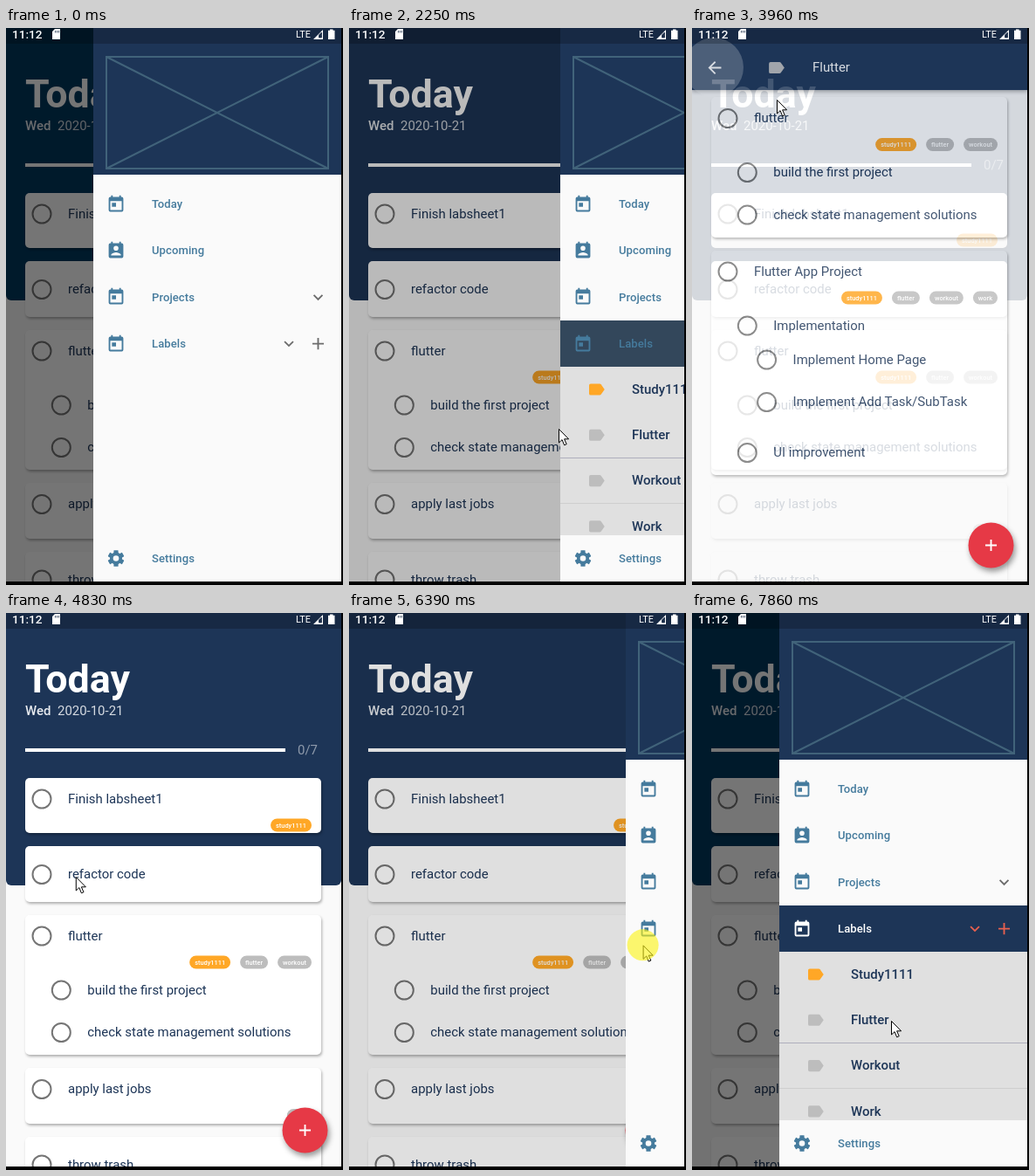
These frames come from a looping animation (386 by 638 pixels, 8 s). An HTML page:

```html
<!DOCTYPE html>
<html lang="en">
<head>
<meta charset="utf-8">
<title>Task list</title>
<style>
  html, body { margin: 0; width: 100%; height: 100%; overflow: hidden; background: #000; }
  svg { display: block; width: 386px; height: 638px; font-family: Roboto, sans-serif; }
  text { white-space: pre; }
  .card { fill: #fff; filter: drop-shadow(1px 2px 1.5px rgba(0, 0, 0, .3)); }
  .fab { fill: #e63946; filter: drop-shadow(2px 4px 3px rgba(0, 0, 0, .4)); }
  .bar { filter: drop-shadow(0 2px 2px rgba(0, 0, 0, .3)); }
  .ring { fill: none; stroke: #757575; stroke-width: 2; }
</style>
</head>
<body>
<svg id="stage" viewBox="0 0 386 638"></svg>
<script>
const NAVY = '#1d3557', DEEP = '#00385f', BLUE = '#457b9d', PAPER = '#fafafa';
const ORANGE = '#ffa726', GREY = '#bdbdbd', DIM = '#6c6c6c', RED = '#e8604f';
const LOOP = 8000, STEP = 77.7, BODY = 14.94, MENU = 13.07;

const CAL = 'M5 3h1V1h2v2h8V1h2v2h1q2 0 2 2v14q0 2-2 2H5q-2 0-2-2V5q0-2 2-2z';
const ICONS = {
  today: CAL + 'M5 8v11h14V8zM7 10h5v5H7z',
  contact: CAL + 'M12 6a3 3 0 0 0 0 6 3 3 0 0 0 0-6zM6 18h12v-1q0-2-6-3-6 1-6 3z',
  tag: 'M17.6 5.8Q17 5 16 5H5Q3 5 3 7v10q0 2 2 2h11q1 0 1.600-.8L22 12z',
  back: 'M20 11H7.800l5.600-5.600L12 4l-8 8 8 8 1.400-1.400L7.800 13H20z',
  more: 'M16.600 8.600 12 13.200 7.400 8.600 6 10l6 6 6-6z',
  add: 'M19 13h-6v6h-2v-6H5v-2h6V5h2v6h6z'
};

const text = (x, y, s, size, fill, weight = 400, more = '') =>
  `<text x="${x}" y="${Math.round(y + size * .355 - .5)}" font-size="${size}" fill="${fill}" font-weight="${weight}" ${more}>${s}</text>`;
const rect = (x, y, w, h, fill, more = '') =>
  `<rect x="${x}" y="${y}" width="${w}" height="${h}" fill="${fill}" ${more}/>`;
const icon = (name, x, y, fill) =>
  `<path fill="${fill}" fill-rule="evenodd" transform="translate(${x - 11.2} ${y - 11.2}) scale(.934)" d="${ICONS[name]}"/>`;

const pen = document.createElement('canvas').getContext('2d');
function chips(y, names) {
  let right = 350;
  return names.slice().reverse().map(name => {
    pen.font = '500 7.4px Roboto, sans-serif';
    const w = pen.measureText(name).width + 12, x = right - w;
    right = x - 11;
    return rect(x, y - 7.5, w, 15, name === 'study1111' ? ORANGE : GREY, 'rx="7.5"') +
      text(x + w / 2, y + .4, name, 7.4, '#fff', 500, 'text-anchor="middle"');
  }).join('');
}

// A card is a heading with chips, then subtasks; '>' marks a deeper level
function cards(top, list) {
  return list.map(([head, tags, ...subs]) => {
    let y = top + (tags.length ? 24 : 32), level = 0;
    const row = s => `<circle class="ring" cx="${41 + level * 22.3}" cy="${y}" r="10.5"/>` +
      text(71 + level * 22.3, y, s, BODY, NAVY);
    let out = row(head) + chips(y + 30, tags);
    if (subs.length) y += 23;
    for (const sub of subs) {
      const depth = sub.startsWith('>') ? 2 : 1;
      y += 48.5 - 9.5 * (depth - level);
      level = depth;
      out += row(sub.replace('>', ''));
    }
    const y0 = Math.floor(top), end = subs.length ? y + 26 : top + 63.5;
    top = end + 15;
    return `<rect class="card" x="22" y="${y0}" width="339" height="${Math.floor(end) - y0}" rx="5"/>` + out;
  }).join('');
}

const FLUTTER = ['flutter', ['study1111', 'flutter', 'workout'], 'build the first project', 'check state management solutions'];

const todayPage = () =>
  rect(0, 0, 384, 634, PAPER) + rect(0, -10, 384, 322, NAVY, 'id="header" rx="6"') +
  text(22, 75.5, 'Today', 44.8, '#fff', 700) +
  text(22, 112, 'Wed', BODY, '#e8ebef', 500) + text(59, 112, '2020-10-21', BODY, '#d5dae1') +
  rect(22, 155, 298, 4, '#fff') + text(334, 157, '0/7', BODY, '#8e9aab') +
  cards(189, [['Finish labsheet1', ['study1111']], ['refactor code', []], FLUTTER,
    ['apply last jobs', ['work']], ['throw trash', []]]);

const labelPage = () =>
  rect(0, 0, 384, 800, PAPER) + rect(0, 0, 384, 70, NAVY, 'class="bar"') +
  '<circle id="ripple" cx="25" cy="44" fill="#fff" fill-opacity=".25"/>' +
  icon('back', 26, 44.5, '#fff') + icon('tag', 96.5, 44.5, GREY) + text(138, 44.5, 'Flutter', BODY, '#fff') +
  cards(78.5, [FLUTTER, ['Flutter App Project', ['study1111', 'flutter', 'workout', 'work'], 'Implementation',
    '>Implement Home Page', '>Implement Add Task/SubTask', 'UI improvement']]);

const rowY = i => 202 + 53.2 * i;
const menuText = (y, s, fill) => text(167, y, s, MENU, fill, 500, 'letter-spacing=".08"');
const menuRow = (name, i, s, fill) => icon(name, 126, Math.round(rowY(i)), fill) + menuText(rowY(i), s, fill);
const labelsRow = (ink, tool) =>
  menuRow('today', 3, 'Labels', ink) + icon('more', 324, rowY(3), tool) + icon('add', 357.5, rowY(3), tool);
const labelItem = (s, i) =>
  icon('tag', 141.4, 414 + i * 52.3, i ? GREY : ORANGE) + text(182, 414 + i * 52.3, s, BODY, NAVY, 500);
const activeRow = (id, fill, ink, tool) => `<g id="${id}">${rect(100, 335, 284, 53, fill)}${labelsRow(ink, tool)}</g>`;

function gear(x, y) {
  const teeth = [0, 60, 120].map(a => rect(-2.6, -9.3, 5.2, 18.6, BLUE, `rx=".6" transform="rotate(${a})"`)).join('');
  return `<g transform="translate(${x} ${y})">${teeth}<circle r="7" fill="${BLUE}"/><circle r="3.3" fill="${PAPER}"/></g>`;
}

const drawer = () =>
  rect(100, 168, 284, 466, PAPER) + rect(100, 0, 284, 168, NAVY) +
  '<path d="M115 33H369V161H115zL369 161M369 33 115 161" fill="none" stroke="#41637a" stroke-width="2"/>' +
  menuRow('today', 0, 'Today', BLUE) + menuRow('contact', 1, 'Upcoming', BLUE) +
  menuRow('today', 2, 'Projects', BLUE) + icon('more', 357.5, rowY(2), DIM) + labelsRow(BLUE, DIM) +
  activeRow('active', NAVY, '#fff', RED) + activeRow('leaving', '#33475b', BLUE, BLUE) +
  '<g clip-path="url(#fold)">' + rect(100, 388, 284, 193, '#e0e0e0') +
  rect(100, 492, 284, 1, '#aeaebc') + rect(100, 544, 284, 1, '#cecece') +
  ['Study1111', 'Flutter', 'Workout', 'Work'].map(labelItem).join('') + '</g>' +
  rect(100, 581, 284, 53, PAPER) + gear(126, 607.5) + menuText(608, 'Settings', BLUE);

const statusBar = () =>
  rect(0, 0, 384, 18, '#000', 'fill-opacity=".22"') +
  text(7, 7.5, '11:12', 13.6, '#fff', 500) + text(332, 7.5, 'LTE', 10.8, '#fff') +
  '<path d="M56 1h6v12h-9V4zM352 13 363 2V13zM371 1.500h3.500v1.200h2V13h-7.500V2.700h2z" fill="#fff"/>' +
  '<path d="M56.500 3v2.500M58.500 3v2.500M60.500 3v2.500M358.500 11V8l3-3v6z" fill="#1a2c48" stroke="#1a2c48" stroke-width=".8"/>';

const $ = id => document.getElementById(id);
$('stage').innerHTML =
  '<defs><clipPath id="fold"><rect id="foldBox" x="100" y="388" width="284" height="0"/></clipPath></defs>' +
  `${todayPage()}<g id="label">${labelPage()}</g>` +
  '<circle class="fab" cx="342.5" cy="592.5" r="26"/>' + icon('add', 342.5, 592.5, '#fff') +
  rect(0, 0, 384, 634, '#000', 'id="scrim"') + `<g id="drawer">${drawer()}</g>` + statusBar() +
  rect(0, 634, 386, 4, '#000') + rect(384, 0, 2, 638, '#000') +
  '<g id="cursor"><path d="M.5.5V16l3.600-3.400 2.500 6.200 2.600-1.100-2.600-5.900h5z" fill="#fff" stroke="#000"/>' +
  '<circle id="press" r="18" fill="#fcf410" fill-opacity=".6"/></g>';

// Pointer moves: start, end, x, y
const HOME = [203, 559];
const MOVES = [
  [80, 300, 321, 365], [480, 1240, 244, 419], [1690, 1860, 240, 459], [2600, 2860, 223, 368],
  [2940, 3600, 22, 36], [3760, 3960, 97, 82], [3960, 4600, 52, 289], [4680, 5440, 374, 440],
  [5440, 5720, 288, 375], [5720, 5960, 362, 386], [6230, 6700, 245, 360],
  [7150, 7540, 231, 480], [7690, 7840, 228, 467]
];
// Presses: start, length
const PRESSES = [[300, 170], [2080, 160], [3640, 150], [6140, 560], [7060, 80]];

const ramp = (t, start, length) => Math.min(1, Math.max(0, (t - start) / length));
const smooth = u => u * u * (3 - 2 * u);
const pointer = t => MOVES.reduce(([px, py], [from, to, x, y]) => {
  const u = smooth(ramp(t, from, to - from));
  return [px + (x - px) * u, py + (y - py) * u];
}, HOME);

// Cubic easing with control heights 0 and 1
function bezier(x1, x2, u) {
  let lo = 0, hi = 1;
  for (let i = 0; i < 20; i++) {
    const s = (lo + hi) / 2, r = 1 - s;
    if (3 * r * r * s * x1 + 3 * r * s * s * x2 + s ** 3 < u) lo = s; else hi = s;
  }
  return 3 * (1 - lo) * lo * lo + lo ** 3;
}
const set = (id, name, value) => $(id).setAttribute(name, value);

function draw(t) {
  set('cursor', 'transform', `translate(${pointer(t)})`);
  set('cursor', 'opacity', t > 70 ? 1 : 0);
  set('press', 'opacity', PRESSES.some(([from, length]) => t >= from && t < from + length) ? 1 : 0);

  const open = 1 - ramp(t, 2133, 240) + ramp(t, 6230, 600);
  const fold = t < 2480 ? smooth(ramp(t, 470, 220)) : smooth(ramp(t, 7120, 220));
  set('drawer', 'transform', `translate(${Math.round(284 * (1 - open))} 0)`);
  set('scrim', 'opacity', .54 * open);
  set('header', 'fill', open > .99 ? DEEP : NAVY);
  set('active', 'opacity', fold);
  set('leaving', 'opacity', open < .8 ? fold : 0);
  set('foldBox', 'height', 193 * fold);

  const route = ramp(t, 2316, 300) - ramp(t, 3930, 300);
  set('label', 'opacity', bezier(.42, 1, route));
  set('label', 'transform', `translate(0 ${155 * (1 - bezier(.4, .2, route))})`);
  set('ripple', 'r', 34 * ramp(t, 3740, 200));
}

const start = performance.now();
function tick() {
  const t = (performance.now() - start) % LOOP;
  draw(Math.floor((t + 6) / STEP) * STEP);
  requestAnimationFrame(tick);
}
tick();
</script>
</body>
</html>
```
